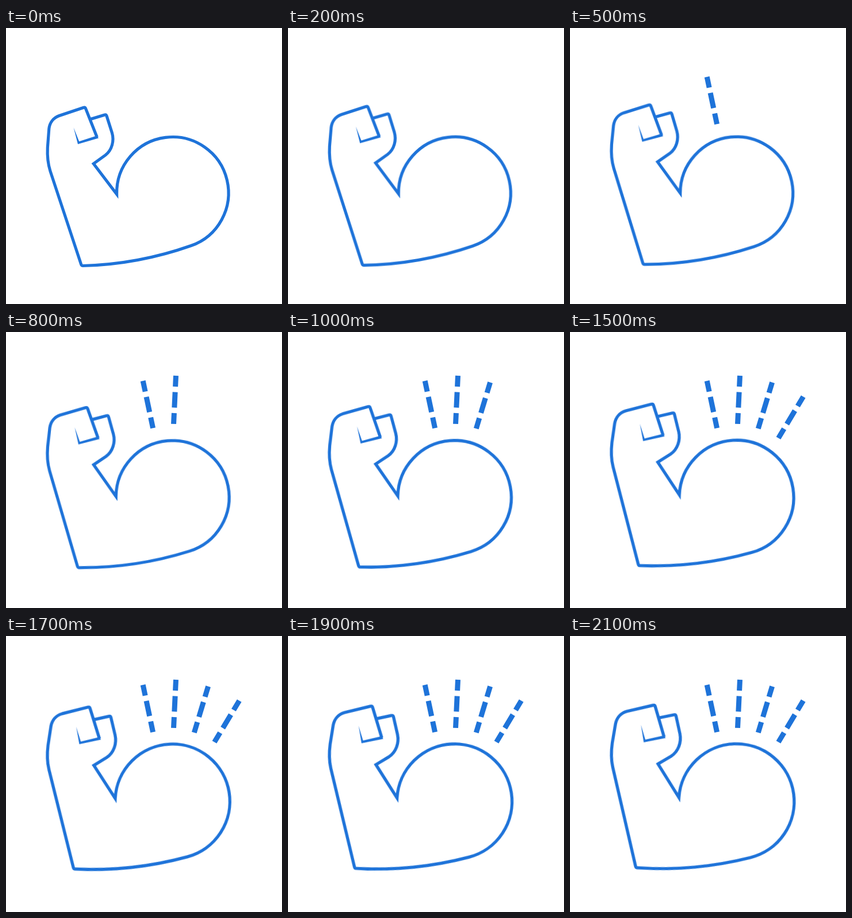
An HTML page for the animation above (2.2 s loop, 480 px wide and 480 px high).

```html
<!DOCTYPE html>
<html lang="en">
<head>
<meta charset="utf-8">
<title>Flexing arm</title>
<style>
  html, body { margin: 0; width: 100%; height: 100%; overflow: hidden; background: #fff; }
  svg { display: block; width: 100%; height: 100%; }

  .arm {
    fill: none;
    stroke: #1e73d9;
    stroke-width: 5.2;
    transform-origin: 290px 288px;
    animation: flex 2200ms steps(22, end) infinite;
  }
  .arm .nail { fill: #1e73d9; stroke: none; }

  .rays {
    stroke: #1e73d9;
    stroke-width: 9;
    stroke-dasharray: 19 9.5 27 9.5 19 20;
  }
  .rays line { animation: 2200ms step-end infinite; }
  .rays line:nth-child(1) { animation-name: ray1; }
  .rays line:nth-child(2) { animation-name: ray2; }
  .rays line:nth-child(3) { animation-name: ray3; }
  .rays line:nth-child(4) { animation-name: ray4; }

  /* the arm swells and tilts while the rays pop up one by one */
  @keyframes flex {
    from { transform: translate(0, 0) rotate(0deg) scale(1); }
    to { transform: translate(-0.4px, 1.2px) rotate(5.6deg) scale(1.034); }
  }
  @keyframes ray1 { 0% { opacity: 0; } 13.63%, 100% { opacity: 1; } }
  @keyframes ray2 { 0% { opacity: 0; } 27.27%, 100% { opacity: 1; } }
  @keyframes ray3 { 0% { opacity: 0; } 45.45%, 100% { opacity: 1; } }
  @keyframes ray4 { 0% { opacity: 0; } 59.09%, 100% { opacity: 1; } }
</style>
</head>
<body>
<svg viewBox="0 0 480 480">
  <g class="arm">
    <!-- forearm, fist and finger edge -->
    <path d="M147 158.5 L171 151.2 Q174.2 150.2 175.2 153.4 L184.3 182
             C188.5 196 184.5 212 173 221 L152.3 236 L192.6 289
             A97.2 97.2 0 1 1 322 378.5
             Q230 411 134 413.5 Q131.5 413.6 130.7 411.2
             L77 249 C72.5 235 71.5 224 72.3 208 L74.8 175
             C76 165 82 156.5 92 152.7 L134.5 138.5 Q137.6 137.4 138.7 140.4 L158.3 190"/>
    <path class="nail" d="M117.5 173 L125 202 L161 191.5 L158 187.3 L127.2 197.3 Z"/>
  </g>
  <g class="rays">
    <line x1="238.2" y1="85" x2="255.6" y2="167.3"/>
    <line x1="295.5" y1="76" x2="291.5" y2="160.2"/>
    <line x1="351.6" y1="87.6" x2="327.3" y2="168"/>
    <line x1="405.7" y1="112.5" x2="362.3" y2="184.8"/>
  </g>
</svg>
</body>
</html>
```
